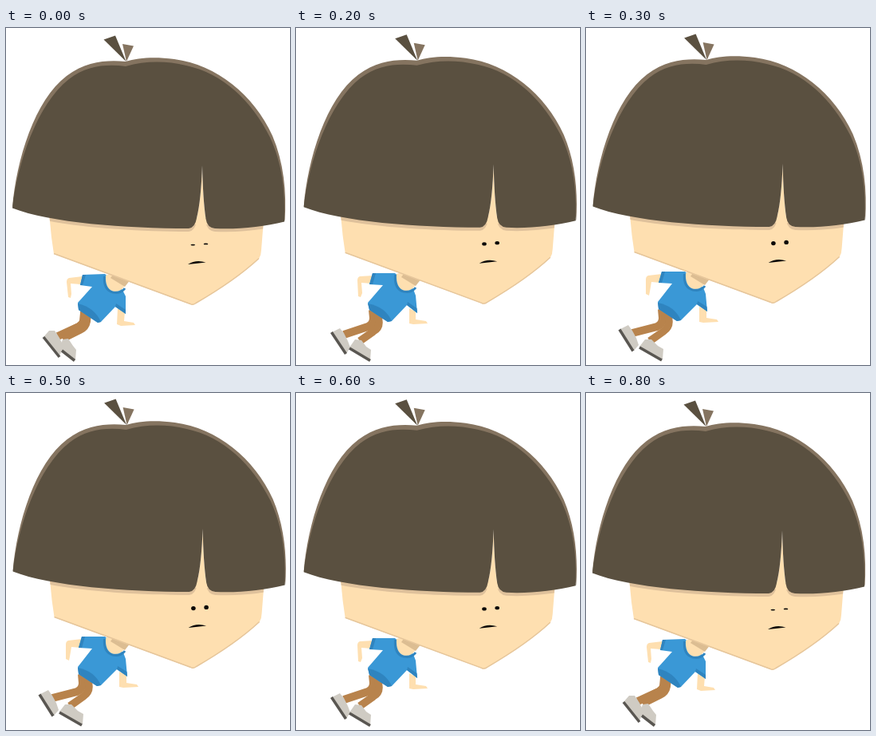
An HTML page that plays this animation: 356 by 422 pixels, repeating every 900 ms.

```html
<!DOCTYPE html>
<html lang="en">
<head>
<meta charset="utf-8">
<title>Floating boy</title>
<style>
html, body { margin: 0; width: 100%; height: 100%; overflow: hidden; background: #fff; }
svg { display: block; width: 100%; height: 100%; }
</style>
</head>
<body>
<svg viewBox="0 0 356 422" xmlns="http://www.w3.org/2000/svg">
  <defs>
    <path id="face" d="M54 232L57 262L60 283L231 346Q234 348 238 345Q288 316 317 289Q320 284 320 278L323 240Z"/>
    <path id="hair" d="M8 225.500C14 170 39 95 79 64C101 47 126 45 150 48C175 41 200 41 226 47C272 57 308 91 331 137C347 172 350 205 349 242.500C322 249 290 252.500 262 251Q252 250 250.500 239C248 222 246.600 200 246 172C245 200 243 222 239 238Q237 250 229 251C150 251 55 244 8 225.500Z"/>
    <clipPath id="faceClip"><use href="#face"/></clipPath>
  </defs>
  <g id="body"></g>
  <g id="head">
    <use href="#face" fill="#fedfb0"/>
    <path d="M60 282.500L231 345.500Q234 347.500 238 344.500Q288 315.500 317 288.500" fill="none" stroke="#e6c69b" stroke-width="1.500"/>
    <g clip-path="url(#faceClip)"><use href="#hair" y="4" fill="#dfc19b"/></g>
    <path d="M246 172C245 200 243 222 239 238L237 246L253 246L250.500 239C248 222 246.600 200 246 172Z" fill="#fedfb0"/>
    <path fill="#857460" d="M8 225C13 165 36 90 76 60C101 41 128 40 150 42C165 37.500 185 35.500 211 39C264 46 311 84 334 135C348 168 352 205 349.500 242L340 200L230 60L150 60L80 75Z"/>
    <use href="#hair" fill="#5a5040"/>
    <path d="M122.500 14.500L137 9.500L150.500 42Z" fill="#5a5040"/>
    <path d="M146 20L160 22.500L151 42Z" fill="#857460"/>
    <g fill="#0c0a08">
      <ellipse class="eye" cx="234.300" cy="271.600" rx="2.800"/>
      <ellipse class="eye" cx="250.500" cy="270.400" rx="2.800"/>
      <path d="M228 296Q238 289.500 250.500 293.500Q240 294.500 228 296Z"/>
    </g>
  </g>
</svg>
<script>
const SKIN = '#fedfb0', BLUE = '#3a98d6', HEM = '#2f84bf';
const PANTS = '#b8834c', SHOE = '#cfcbc3', SOLE = '#595651';

// Each part: fill, stroke, line width, then its path in the low, middle and high pose.
const parts = [
  ['none', PANTS, 10,
    'M98 355L98 366Q97 371 91 374L65 386',
    'M96 353L97 363Q97 371 90 374L60 384',
    'M95 352L96 363Q96 371 89 374L58 382'],
  ['none', PANTS, [14, 9.5, 9.5],
    'M100 357L99 367Q98 373 92 376L70 387',
    'M103 358L104 369Q104 376 97 380L80 392',
    'M103 357L104 368Q104 375 97 380L80 392'],
  [SHOE, 'none', 0,
    'M47 387L54 379L61 379L67 388L72 398L67 411Z',
    'M45 381L55 376L60 382L65 392L68 400L63 408Z',
    'M43 377L53 372L58 379L63 388L66 397L60 404Z'],
  ['none', SOLE, 3.5, 'M47 387L67 412', 'M44.5 381L62.5 408', 'M42 377.5L59 404.5'],
  [SHOE, 'none', 0,
    'M67 402L71 390L78 389L84 398L88 403L87 416Z',
    'M67 400L74 390L82 391L88 399L94 403L93 416Z',
    'M67 399L74 390L82 390L90 398L97 402L96 415Z'],
  ['none', SOLE, 3.5, 'M70 404L86 416.5', 'M67 401L93 416.5', 'M67 400L95 416'],
  [SKIN, 'none', 0,
    'M96 311L79 313Q76 314 76 318L78 337L81 338L82 333L81 320L94 321Z',
    'M97 310L80 311Q77 312 77 316L78 336L81 337L83 332L82 319L95 320Z',
    'M95 308L78 310Q75 311 75 315L75 333L79 335L80 330L82 318L94 319Z'],
  [SKIN, 'none', 0,
    'M140 351L149 355L148 367L160 369L162 372L144 373L139 371Z',
    'M142 351L150 355L150 365L163 367L165 370L147 371L142 370Z',
    'M142 349L151 353L151 363L164 365L166 368L147 369L142 368Z'],
  [BLUE, 'none', 0,
    'M96 309L124 308L146 328L150 336L150 358L137 349L119 368L115 369L91 353L90 344L108 324L93 322Z',
    'M96 307L124 307L147 327L150 335L152 357L139 347L120 367L115 368L92 353L90 344L109 322L92 321Z',
    'M95 305L124 305L147 325L150 333L152 355L139 346L119 366L114 367L91 352L90 343L108 320L91 319Z'],
  [HEM, 'none', 0,
    'M96 309L100 309L96 322L93 322Z',
    'M96 307L100 307L96 321L92 321Z',
    'M95 305L99 305L95 319L91 319Z'],
  [HEM, 'none', 0,
    'M138 345L150 353L150 358L137 349Z',
    'M140 343L151.5 351L152 357L139 347Z',
    'M140 342L151.5 349L152 355L139 346Z'],
  [HEM, 'none', 0,
    'M90 345Q111 350 119 368L115 369L91 353Z',
    'M90 345Q112 349 120 367L115 368L92 353Z',
    'M90 344Q111 348 119 366L114 367L91 352Z'],
  ['none', HEM, 3,
    'M123.5 311Q122 328 134 331Q144 333 149 326',
    'M124.5 309Q123 327 135 330Q145 332 150 325',
    'M123.500 308Q122 325 134 328Q144 330 149 323'],
  [SKIN, 'none', 0,
    'M125 310Q124 326 134 329.5Q143 331 147 325L155 316L135 306Z',
    'M126 308Q125 325 135 328.5Q144 330 148 324L156 315L136 305Z',
    'M125 307Q124 323 134 326.5Q143 328 147 322L155 313L135 303Z'],
  ['#dcbd92', 'none', 0,
    'M131 313L136 306L156 315L149 324Z',
    'M132 312L137 305L157 314L150 323Z',
    'M131 311L136 304L156 313L149 322Z']
];

const body = document.getElementById('body');
const head = document.getElementById('head');
const eyes = document.querySelectorAll('.eye');

const nodes = parts.map(([fill, stroke]) => {
  const el = document.createElementNS('http://www.w3.org/2000/svg', 'path');
  el.setAttribute('fill', fill);
  el.setAttribute('stroke', stroke);
  body.appendChild(el);
  return el;
});

// Blend three keys; p runs from 0 through 2 and may overshoot slightly.
function blend(keys, p) {
  const i = p < 1 ? 0 : 1;
  return keys[i] + (keys[i + 1] - keys[i]) * (p - i);
}

function blendPath(paths, p) {
  const nums = paths.map(d => d.match(/[\d.]+/g).map(Number));
  let n = 0;
  return paths[0].replace(/[\d.]+/g, () => {
    const v = blend(nums.map(a => a[n]), p);
    n++;
    return v.toFixed(2);
  });
}

const STEP = 100;
const poses = [0, 0.5, 1, 2, 2.4, 2, 1, 0.5, 0];
let shown = -1;

function draw(p) {
  parts.forEach(([, , width, ...paths], i) => {
    nodes[i].setAttribute('d', blendPath(paths, p));
    nodes[i].setAttribute('stroke-width', Array.isArray(width) ? blend(width, p) : width);
  });
  const x = blend([0, 1.7, 0.6], p), y = blend([0, -1.2, -2], p);
  head.setAttribute('transform', `translate(${x} ${y})`);
  eyes.forEach(e => e.setAttribute('ry', blend([0.9, 2.1, 2.6], p)));
}

function tick(now) {
  const step = Math.floor(now / STEP) % poses.length;
  if (step !== shown) draw(poses[shown = step]);
  requestAnimationFrame(tick);
}

draw(poses[0]);
requestAnimationFrame(tick);
</script>
</body>
</html>
```
